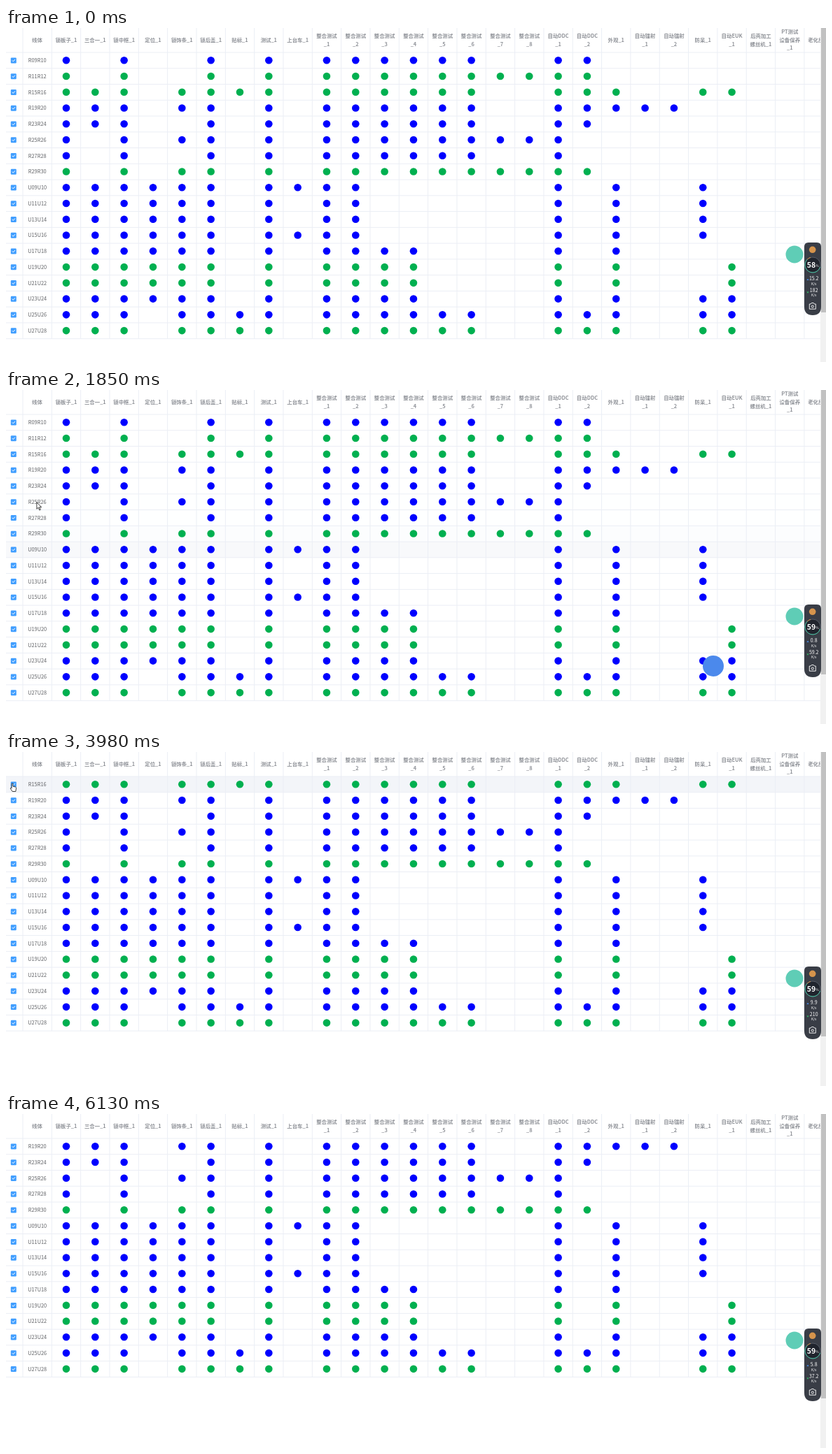
These frames come from a looping animation (1171x478 px, 6200 ms). An HTML page:

```html
<!DOCTYPE html>
<html lang="zh">
<head>
<meta charset="utf-8">
<style>
  html, body { margin: 0; height: 100%; overflow: hidden; background: #fff; }
  svg { display: block; width: 1171px; height: 478px; }
  text { font-family: "Noto Sans CJK SC", "Noto Sans CJK", "Noto Sans", sans-serif; text-anchor: middle; }
  #head text { font-size: 7.4px; font-weight: 700; fill: #909399; }
  #rows text { font-size: 7.4px; fill: #606266; }
  #meter text { fill: #fff; }
  .num { font-size: 7px; }
  .unit { font-size: 5px; }
  .line { fill: none; stroke: #ebeef5; }
</style>
</head>
<body>
<svg viewBox="0 0 1171 478">
  <defs><clipPath id="page"><path d="M0 0H1163V478H0z"/></clipPath></defs>
  <g clip-path="url(#page)">
    <g id="hover" fill="#f3f5f9"></g>
    <g id="head"></g>
    <g id="rows"></g>
  </g>
  <path d="M1163 0h8v478h-8z" fill="#f1f1f1"/>
  <path d="M1164 0h7v407h-7z" fill="#c1c1c1"/>
  <circle id="badge" cx="1010" cy="395" r="15" fill="#4b89ec"/>
  <circle id="buddy" cx="1126" cy="324" r="12.5" fill="#5fcdb6"/>
  <g id="meter">
    <path d="M1146 307h12q6 0 6 6v86q0 12-12 12t-12-12v-86q0-6 6-6z" fill="#393d46"/>
    <circle cx="1151.7" cy="317.3" r="4.8" fill="#d6944c"/>
    <circle cx="1152" cy="339" r="11" fill="#20242d" stroke="#565c67"/>
    <path d="M1144.2 331.2A11 11 0 1 0 1162.6 342" fill="none" stroke="#45c9a5"/>
    <path d="M1144.2 331.2A11 11 0 0 1 1149 328.4" fill="none" stroke="#e09a4a"/>
    <text id="load" x="1150" y="343" font-size="10.5" font-weight="700"></text>
    <text x="1158.6" y="342.3" font-size="4.5">%</text>
    <path d="M1143.5 361l1.5-2.2 1.5 2.2z" fill="#4a90f0"/>
    <path d="M1143.5 377.5l1.5 2.2 1.5-2.2z" fill="#35c46a"/>
    <text id="up" class="num" x="1153.7" y="361.3"></text>
    <text class="unit" x="1153.7" y="367.6">K/s</text>
    <text id="down" class="num" x="1153.7" y="378"></text>
    <text class="unit" x="1153.7" y="384.3">K/s</text>
    <g fill="none" stroke="#fff" stroke-width=".9">
      <path d="M1147.3 395h2l1-1.5h3l1 1.5h2v7.2h-9z"/>
      <circle cx="1151.8" cy="398.5" r="1.6"/>
    </g>
  </g>
  <circle id="click" r="7" fill="#ff0" fill-opacity=".47"/>
  <g id="cursor" fill="#fff" stroke="#111" stroke-width=".8" stroke-linejoin="round">
    <path id="arrow" d="M0 0V9.6L2.2 7.5 3.9 11.3 5.4 10.6 3.8 7H6.8z"/>
    <path id="hand" d="M-.9.8Q0-.5.9.8V4.6L4.6 5.6Q5.8 6 5.6 7.2L4.8 12H.2L-2.8 7.6Q-2.6 6.4-1.6 6.8L-.9 7.6z"/>
  </g>
</svg>
<script>
const LOOP = 6200, COL = 41.33, ROW = 22.76, TOP = 35, FADE = 250;
const $ = id => document.getElementById(id);

const heads = ['锁板子_1', '三合一_1', '锁中框_1', '定位_1', '锁饰条_1', '锁后盖_1', '贴标_1', '测试_1', '上台车_1',
  ...[1, 2, 3, 4, 5, 6, 7, 8].map(n => '整合测试 _' + n),
  '自动DDC _1', '自动DDC _2', '外观_1', '自动镭射 _1', '自动镭射 _2', '防呆_1', '自动EUK _1',
  '后壳加工 螺丝机_1', 'PT测试 设备保养 _1', '老化房_1'];

// label, colour (b/g), one letter per filled column
const lines = `R09R10 b acfhjklmnors
R11R12 g acfhjklmnopqrs
R15R16 g abcefghjklmnorstwx
R19R20 b abcefhjklmnorstuv
R23R24 b abcfhjklmnors
R25R26 b acefhjklmnopqr
R27R28 b acfhjklmnor
R29R30 g acefhjklmnopqrs
U09U10 b abcdefhijkrtw
U11U12 b abcdefhjkrtw
U13U14 b abcdefhjkrtw
U15U16 b abcdefhijkrtw
U17U18 b abcdefhjklmrt
U19U20 g abcdefhjklmrtx
U21U22 g abcdefhjklmrtx
U23U24 b abcdefhjklmrtwx
U25U26 b abcefghjklmnorstwx
U27U28 g abcefghjklmnorstwx`.split('\n').map(s => s.split(' '));

const colX = i => 86 + COL * i;
const grid = h => `<path class="line" d="M0 ${h}H1163M24 0V${h}` +
  heads.map((_, i) => `M${colX(i) - COL / 2} 0V${h}`).join('') + '"/>';
const label = (x, y, s) => `<text x="${x}" y="${y}">${s}</text>`;

$('head').innerHTML = grid(TOP) + label(44.5, 19.7, '线体') + heads.map((h, i) => {
  const parts = h.split(' ');
  return parts.map((s, k) => label(colX(i), 19.7 + (k - (parts.length - 1) / 2) * 11.7, s)).join('');
}).join('');

$('rows').innerHTML = lines.map(([name, colour, cols]) => `<g>${grid(ROW)}
  <rect x="6.8" y="7.4" width="8" height="8" rx="1.2" fill="#409eff"/>
  <path d="M8.8 11.3l1.5 1.6 2.6-3" fill="none" stroke="#fff"/>
  ${label(44.7, 14.1, name)}
  <g class="${colour}" fill="${colour == 'b' ? '#00f' : '#00b050'}">` +
  [...cols].map(c => `<circle cx="${colX(c.charCodeAt() - 97)}" cy="11.2" r="5.3"/>`).join('') +
  '</g></g>').join('');

$('hover').innerHTML = lines.map((_, i) =>
  `<rect y="${TOP + ROW * i}" width="1163" height="${ROW}"/>`).join('');

const rows = [...$('rows').children], bands = [...$('hover').children];
const blues = document.querySelectorAll('.b');

const path = [[470, 488, 425], [610, 497, 320], [1060, 470, 244], [1580, 440, 236], [1720, 220, 224],
  [1800, 90, 200], [1850, 44, 161], [2190, 9, 62], [2460, 9, 60], [2520, 9, 44.5], [4850, 9, 44.5],
  [5390, 1109, 453], [5530, 1109, 466], [5660, 1117, 464], [5800, 1117, 464]];
const removed = [2970, 3780, 4510];
const rates = [[0, 15.2, 182], [990, 0.8, 59.2], [1980, 9.8, '66.0'], [2970, 15.4, 215],
  [3980, 9.9, 210], [4980, 7.6, 94.5], [6000, 5.8, 37.2]];

const within = (t, ...spans) => spans.some(([a, b]) => t >= a && t < b);
const show = (el, on) => el.setAttribute('visibility', on ? 'inherit' : 'hidden');
const goneAt = t => removed.filter(r => t >= r).length;

function pointer(t) {
  if (!within(t, [470, 5460], [5530, 5800])) return null;
  const i = path.findIndex(p => p[0] > t), [t0, x0, y0] = path[i - 1], [t1, x1, y1] = path[i];
  const f = (t - t0) / (t1 - t0);
  return [x0 + (x1 - x0) * f, y0 + (y1 - y0) * f];
}

// Row highlight lags: average of the pointer's row over the fade time
function drawHover(t, count) {
  const hits = Array(18).fill(0), N = 12;
  for (let k = 0; k < N; k++) {
    const p = pointer(t - FADE * (k + .5) / N);
    if (p) hits[Math.floor((p[1] - TOP) / ROW)]++;
  }
  bands.forEach((b, i) => b.setAttribute('opacity', i < count ? hits[i] / N : 0));
}

function draw(t) {
  const gone = goneAt(t);
  rows.forEach((r, i) => {
    show(r, i >= gone);
    r.setAttribute('transform', `translate(0 ${TOP + ROW * (i - gone)})`);
  });
  const lit = !within(t, [200, 1190], [2250, 3180], [4250, 5200]);
  blues.forEach(b => show(b, lit));
  drawHover(t, 18 - gone);

  show($('badge'), within(t, [470, 3440]));
  show($('buddy'), !within(t, [2970, 3780], [4510, 6000]));
  const [, up, down] = rates.filter(r => t >= r[0]).pop();
  $('load').textContent = t < 1130 ? 58 : 59;
  $('up').textContent = up;
  $('down').textContent = down;

  const p = pointer(t);
  show($('cursor'), p);
  show($('click'), within(t, [2840, 3180], [3440, 3580], [4250, 4320]));
  if (!p) return;
  const move = `translate(${p})`, over = p[0] < 16;
  $('cursor').setAttribute('transform', move);
  $('click').setAttribute('transform', move);
  $('arrow').style.display = over ? 'none' : '';
  $('hand').style.display = over ? '' : 'none';
}

const start = performance.now();
function tick() {
  draw((performance.now() - start) % LOOP);
  requestAnimationFrame(tick);
}
tick();
</script>
</body>
</html>
```
